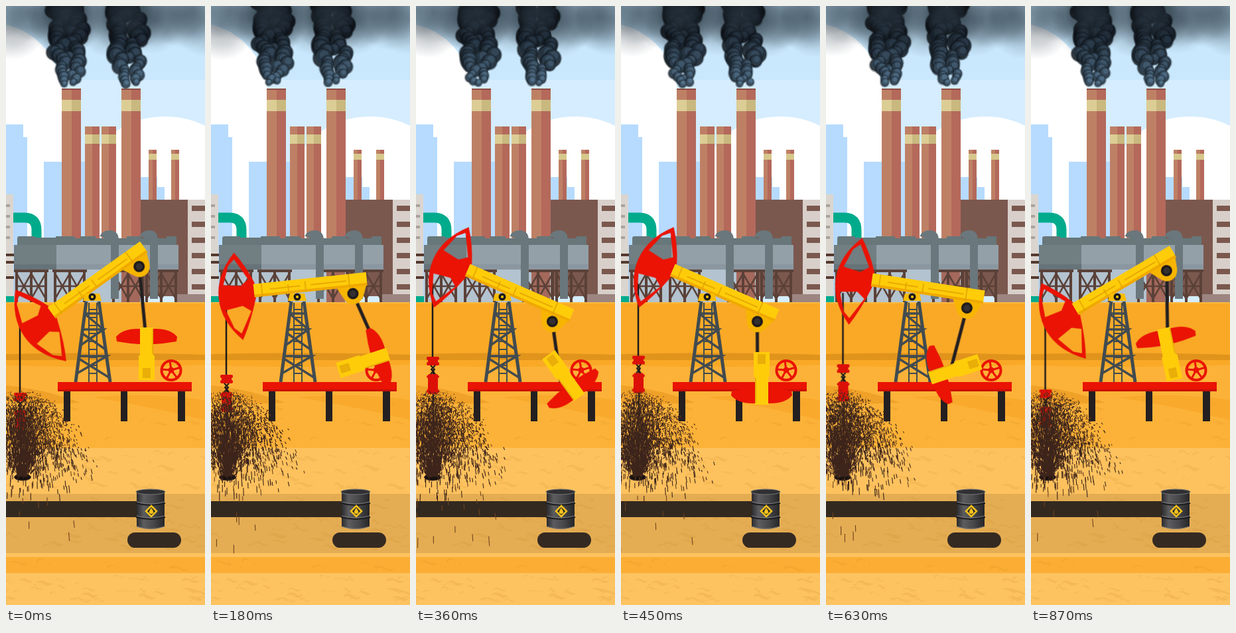
An HTML page with a canvas that plays this animation: 300 px wide and 900 px high, repeating every 900 ms.

```html
<!DOCTYPE html>
<html lang="en">
<head>
<meta charset="utf-8">
<title>Oil pump</title>
<style>
html, body { margin: 0; width: 100%; height: 100%; overflow: hidden; background: #fff; }
svg, canvas { position: absolute; left: 0; top: 0; width: 300px; height: 900px; display: block; }
.beam, .crank, .rod, .cable { animation: 900ms steps(12) infinite; }
.beam { animation-name: rock; }
.cable { animation-name: lift; }
.crank { animation-name: spin; animation-timing-function: steps(30); filter: blur(.5px); }
.rod { animation-name: swing; animation-timing-function: steps(6); }
/* the beam rests at the top of its stroke while the crank passes below */
@keyframes rock {
  0%, 100% { transform: rotate(-35.5deg); }
  40%, 60% { transform: rotate(23.5deg); }
}
@keyframes lift {
  0%, 100% { transform: translate(0, 0); }
  40% { transform: translate(4px, -54px); animation-timing-function: steps(6); }
  60% { transform: translate(6px, -57px); }
}
@keyframes spin { to { transform: rotate(360deg); } }
@keyframes swing {
  0%, 100% { transform: rotate(30deg); }
  20% { transform: rotate(-18deg); }
  40% { transform: rotate(-31.5deg); }
  60% { transform: rotate(-16deg); }
  80% { transform: rotate(28deg); }
}
</style>
</head>
<body>
<svg viewBox="0 0 300 900">
  <defs>
    <linearGradient id="steel">
      <stop offset="0" stop-color="#2b2b2d"/><stop offset=".25" stop-color="#5c5c5f"/>
      <stop offset=".6" stop-color="#48484a"/><stop offset="1" stop-color="#262628"/>
    </linearGradient>
    <g id="stack">
      <path fill="#be8065" d="M0 0h15v272H0z"/><path fill="#b4695b" d="M15 0h14v272H15z"/>
      <path fill="#dccd95" d="M0 17h15v17H0z"/><path fill="#c9b97f" d="M15 17h14v17H15z"/>
      <path fill="#8d4d42" d="M0 0h29v2H0z"/>
    </g>
    <g id="slim">
      <path fill="#be8065" d="M0 0h11v215H0z"/><path fill="#b4695b" d="M11 0h11v215H11z"/>
      <path fill="#dccd95" d="M0 12h11v14H0z"/><path fill="#c9b97f" d="M11 12h11v14H11z"/>
    </g>
    <g id="far">
      <path fill="#be8065" d="M0 0h6v76H0z"/><path fill="#b4695b" d="M6 0h6v76H6z"/>
      <path fill="#d6c78c" d="M0 6h12v9H0z"/>
    </g>
    <g id="truss" fill="none" stroke="#5b4138" stroke-width="4">
      <path d="M0 398H52M4 396V445M26 396V445M48 396V445"/>
      <path stroke-width="2.500" d="M4 402L26 440M26 402L4 440M26 402L48 440M48 402L26 440M2 421H50"/>
    </g>
  </defs>

  <!-- sky and skyline -->
  <path fill="#d5edfe" d="M0 0h300v450H0z"/>
  <path fill="#c9e8fd" d="M0 0h300v111H0z"/>
  <circle cx="-25" cy="135" r="110" fill="#fff"/>
  <path fill="#fff" d="M0 135H85V445H0zM112 240h90v205h-90z"/>
  <ellipse cx="240" cy="261" rx="115" ry="95" fill="#fff"/>
  <path fill="#b6dbff" d="M0 178H26V197H32V445H0zM57 234H120V445H57zM203 257H228V272H239V300H203z"/>
  <use href="#stack" x="84" y="124"/><use href="#stack" x="174" y="124"/>
  <use href="#slim" x="119" y="181"/><use href="#slim" x="144" y="181"/>
  <use href="#far" x="215" y="216"/><use href="#far" x="249" y="216"/>

  <!-- factory -->
  <path fill="#b3c3cf" d="M12 396H205V445H12z"/>
  <path fill="#a4695c" d="M174 396h28v49h-28z"/>
  <path fill="#7b584e" d="M203 291h71V436h-71z"/>
  <path fill="#d8cfca" d="M274 291h26V434h-26z"/>
  <path stroke="#7b584e" stroke-width="8" d="M280 304h20M280 328h20M280 352h20M280 375h20M280 399h20M280 422h20"/>
  <path fill="#9c8580" d="M255 433h45v12h-45z"/>
  <path fill="#dbd5cf" d="M0 283H11V436H0z"/>
  <path stroke="#aaa29d" stroke-width="4" d="M0 300H6M0 316H6M0 332H6M0 348H6"/>
  <path fill="none" stroke="#00ab8c" stroke-width="15" d="M11 318H28Q46 318 46 337V348"/>
  <path fill="#00ab8c" d="M0 436H12V445H0z"/>
  <use href="#truss" x="12"/><use href="#truss" x="70"/><use href="#truss" x="158"/><use href="#truss" x="208"/>
  <path stroke="#54392f" stroke-width="4" d="M0 374H16M0 385H15M0 408H12"/>
  <path fill="#67777a" d="M17 349Q17 346 20 346H44V348H75V346H104V349H112V346H135V349H182V346H204V349H242V346H257V360H17z"/>
  <path fill="#94a0a8" d="M76 359H260V396H76z"/>
  <path fill="#717e82" d="M12 359H76V396H12z"/>
  <path fill="#667378" d="M12 388H76V396H12z"/><path fill="#8b97a0" d="M76 388H260V396H76z"/>
  <g fill="none" stroke="#6a777c" stroke-width="12">
    <path d="M147 348Q149 343 157 343Q164 343 164 352V440"/>
    <path d="M207 348Q209 343 217 343Q223 343 223 352V440"/>
  </g>

  <!-- ground -->
  <path fill="#f9a926" d="M0 445H300V664H0z"/>
  <path fill="#fbb93f" d="M0 445H300V447H0z"/>
  <path fill="#e0941c" d="M0 523Q150 519 300 524V532H0z"/>
  <path fill="#fcb238" d="M0 540Q150 545 300 539V664H0z"/>
  <path fill="#efa128" d="M0 570Q60 576 112 596Q50 600 0 594z"/>
  <path fill="#f9a92c" d="M130 588Q220 580 300 592V622Q210 600 130 588z"/>
  <path fill="#fdc25e" d="M0 664H300V734H0z"/>
  <path fill="#e4ad53" d="M0 733H300V822H0z"/>
  <path fill="#fdc25e" d="M0 822H300V829H0z"/>
  <path fill="#fbae33" d="M0 828H300V853H0z"/>
  <path fill="#fcc360" d="M0 852H300V900H0z"/>
  <path id="sand" fill="#b97512" fill-opacity=".12"/>

  <!-- pipe, puddle, barrel -->
  <path fill="#33291f" d="M0 744H198V768H0z"/>
  <rect x="183" y="791" width="81" height="23" rx="11.5" fill="#352a22"/>
  <path fill="url(#steel)" d="M197 730V782Q218 790 239 782V730z"/>
  <ellipse cx="218" cy="730" rx="22" ry="4" fill="#303032" stroke="#77777a"/>
  <path fill="none" stroke="#1e1e20" stroke-width="2" d="M196 747Q218 753 240 747M196 768Q218 774 240 768"/>
  <path fill="none" stroke="#7b7b7e" d="M197 745Q218 751 239 745M197 766Q218 772 239 766M197 782Q218 789 239 782"/>
  <path fill="#29292b" stroke="#f6c21d" stroke-width="2.500" d="M219 751L227 759L219 767L211 759z"/>
  <path fill="#f6c21d" d="M219 754Q223 760 222 761.500Q219 765 216 761.500Q215 760 219 754z"/>
  <ellipse cx="25" cy="708" rx="12.500" ry="5" fill="#17110f" stroke="#4a342b"/>

  <!-- platform and tower -->
  <path fill="#241f20" d="M87 578h10v46H87zM173 578h10v46h-10zM259 578h11v46h-11z"/>
  <g fill="none" stroke="#414b50">
    <path stroke-width="2" d="M125 446V565M137 446V565M125 456h12M125 468h12M125 480h12M125 492h12M125 504h12M125 516h12M125 528h12M125 540h12M125 552h12"/>
    <path stroke-width="3.500" d="M118 462H144M115 486H147L112 510M111 526H152L107 552M118 462L147 486M115 492L150 516M110 530L155 558"/>
    <path stroke-width="5" d="M121 444L105 565M140 444L157 565"/>
  </g>
  <path fill="#ea1304" d="M78 565H280V579H78z"/>
  <path fill="#c90f05" d="M78 576H280V579H78z"/>
  <g fill="none" stroke="#ea1304" stroke-width="3">
    <circle cx="249" cy="547.500" r="14.500" stroke-width="4"/>
    <path d="M249 547L263 543M249 547L258 559M249 547L242 560M249 547L235 546M249 547L247 533"/>
    <circle cx="249" cy="547" r="3"/>
  </g>

  <!-- cable -->
  <g class="cable">
    <path stroke="#1d191a" stroke-width="2.500" d="M21 474V582M22 600V705"/>
    <g fill="#dd1008">
      <rect x="12" y="581" width="19" height="5" rx="2"/><rect x="14" y="585" width="15" height="5"/>
      <rect x="12" y="589" width="19" height="5" rx="2"/>
      <rect x="14" y="607" width="15" height="30" rx="2"/><rect x="12" y="609" width="19" height="4" rx="2"/>
      <rect x="12" y="630" width="19" height="5" rx="2"/>
    </g>
    <path fill="none" stroke="#1d191a" stroke-width="2" d="M18 594L24 600L18 607M25 594L19 600L25 607"/>
  </g>

  <!-- beam -->
  <g transform="translate(130 437)"><g class="beam">
    <g transform="translate(84 4)"><path class="rod" fill="#231f20" d="M-2.500 0h5V92h-5z"/></g>
    <path fill="#ea1304" fill-rule="evenodd" d="M-88-76Q-118-45-118-10Q-118 25-88 56Q-74 32-62-5V-28Q-72-54-88-76z
      M-99-57L-89-66L-71-34L-83-25L-109-29zM-99 37L-89 46L-71 14L-83 5L-109 9z"/>
    <path fill="#f7b500" d="M60-8H106L99 10Q94 20 83 20Q73 19 69 9z"/>
    <path fill="#ffcc0a" d="M-64-26H107V-6H-64z"/>
    <path fill="#f0a900" d="M-64-10H107V-6H-64z"/>
    <path fill="none" stroke="#e0a000" stroke-width="1.500" d="M-52-26V-6M-40-16H6M-12-20V-10M14-22V-8M22-16H76M80-26V-6"/>
    <circle cx="84" cy="4" r="8.500" fill="#1d191a"/><circle cx="84" cy="4" r="5" fill="#343032"/>
  </g></g>
  <path fill="#f9bd05" d="M119 432H141L144 443H116z"/>
  <circle cx="130" cy="437" r="5.500" fill="#1d191a"/><circle cx="130" cy="437" r="2" fill="#ffcc0a"/>

  <!-- crank -->
  <g transform="translate(212 541)"><g class="crank">
    <path fill="#ea1304" d="M-46-44Q-36-56-14-56H14Q36-56 46-44L45-37Q28-34 12-33H-12Q-28-34-45-37z"/>
    <path fill="#ffcc0a" d="M-10-58H10V-16H12V21H-12V-16H-10z"/>
    <path fill="#e9ae08" d="M-6 3H6V18H-6zM8-56H10V-18H8z"/>
  </g></g>
</svg>
<canvas id="fx" width="300" height="900"></canvas>

<script>
const ctx = document.getElementById('fx').getContext('2d');
const LOOP = 900, STEP = 30, TAU = Math.PI * 2;

let seed = 7;
const rnd = () => (seed = seed * 16807 % 2147483647) / 2147483647;
const span = (a, b) => a + (b - a) * rnd();
const make = (n, fn) => Array.from({ length: n }, fn);

// sand patches: [top, bottom, count]
const sand = [[595, 660, 12], [668, 732, 40], [738, 820, 70], [832, 850, 8], [856, 898, 42]];
document.getElementById('sand').setAttribute('d', sand.map(([top, bottom, n]) => make(n, () => {
  const w = span(8, 32), h = span(2, 6), k = span(-3, 3);
  return `M${span(-10, 300)} ${span(top, bottom - 6)}q${w / 4} ${-h} ${w / 2} ${-k / 2}t${w / 2} ${k}q${-w / 4} ${h * 1.6} ${-w / 2} ${h / 2}t${-w / 2} ${-k}z`;
}).join('')).join(''));

// oil spray
const drops = make(4200, (_, i) => {
  const v = (rnd() + rnd() - 1) * 128;
  return {
    x: span(17, 33), v,
    h: 132 * Math.sqrt(span(.2, 1)) * (1 - .38 * (v / 128) ** 2),
    phase: rnd(), dash: span(.014, .024),
    life: i % 40 ? span(.8, .96) : 1.07, pale: i % 5 === 0
  };
});

function spray(T) {
  for (const pale of [true, false]) {
    ctx.beginPath();
    for (const d of drops) {
      if (d.pale !== pale) continue;
      const u = (T + d.phase) % 1 * d.life;
      const point = s => [d.x + d.v * s ** .7, 708 - d.h * (1 - ((s - .45) / .45) ** 2)];
      ctx.moveTo(...point(u));
      ctx.lineTo(...point(u + d.dash));
    }
    ctx.strokeStyle = pale ? '#6f431f' : '#3c241b';
    ctx.lineWidth = 1.1;
    ctx.stroke();
  }
}

// smoke
const CYCLE = 24, PUFFS = 48;
const plumes = [95, 186].map(x => ({
  x, puffs: make(CYCLE, (_, i) => ({ dx: (i % 2 ? 1 : -1) * span(.1, 1), size: span(.75, 1.2) }))
}));
const haze = make(18, (_, i) => ({ x: i * 18 + span(-8, 8), y: span(-4, 28), r: span(40, 56), p: rnd() * TAU }));

function disc(x, y, r, fill) {
  ctx.fillStyle = fill;
  ctx.beginPath();
  ctx.arc(x, y, r, 0, TAU);
  ctx.fill();
}

function soft(x, y, r, alpha) {
  const g = ctx.createRadialGradient(x, y, 0, x, y, r);
  g.addColorStop(0, `rgba(42,56,68,${alpha})`);
  g.addColorStop(.55, `rgba(50,66,78,${alpha * .6})`);
  g.addColorStop(1, 'rgba(60,75,85,0)');
  disc(x, y, r, g);
}

function smoke(T) {
  for (const h of haze) soft(h.x + 5 * Math.sin(TAU * T + h.p), h.y + 3 * Math.cos(TAU * T + h.p), h.r, .36);
  for (const { x, puffs } of plumes) {
    soft(x - 4, 15, 58, .6);
    for (let i = PUFFS - 1; i >= -CYCLE; i--) {
      const u = (i + CYCLE * T) / PUFFS;
      if (u < 0 || u > 1) continue;
      const p = puffs[(i + CYCLE) % CYCLE];
      const grow = Math.min(1, u / .32);
      const r = (6 + 6 * grow) * p.size;
      const px = x - 4 * u + p.dx * (9 + 11 * grow) + 3 * Math.sin(TAU * (u * 2 - T));
      const py = 117 - 126 * u;
      const k = Math.max(0, 1 - u / .9);
      const tone = (s, a = 1) => `rgba(${86 * k * s | 0},${118 * k * s | 0},${(6 + 138 * k) * s | 0},${a})`;
      disc(px, py, r + 1.5, tone(.5, .35));
      disc(px, py, r, tone(.4, .8));
      disc(px + r * .1, py - r * .14, r * .8, tone(.72));
      disc(px + r * .2, py - r * .32, r * .48, tone(.95));
    }
    soft(x - 4, 8, 40, .8);
  }
}

let start;
function draw(now) {
  start ??= now;
  const T = Math.floor((now - start) % LOOP / STEP) * STEP / LOOP;
  ctx.clearRect(0, 0, 300, 900);
  smoke(T);
  spray(T);
  requestAnimationFrame(draw);
}
requestAnimationFrame(draw);
</script>
</body>
</html>
```
